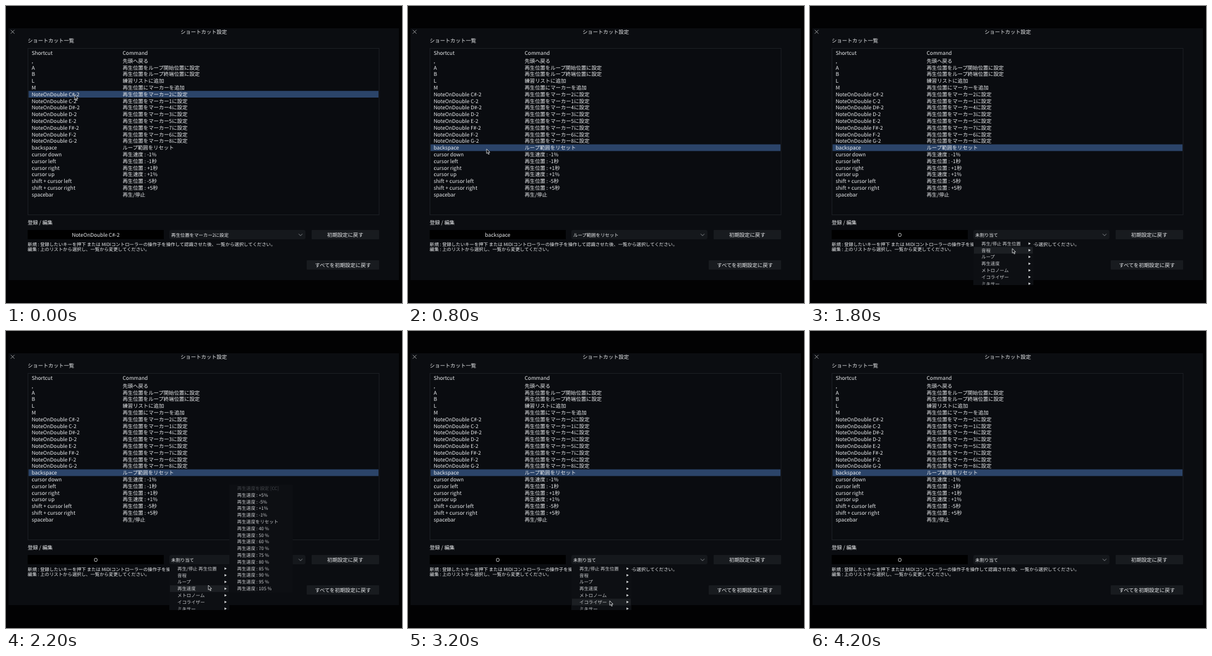
These frames come from a looping animation (640 px wide and 480 px high, 4400 ms). An HTML page:

```html
<!DOCTYPE html>
<html lang="ja">
<head>
<meta charset="utf-8">
<style>
html, body { margin: 0; width: 100%; height: 100%; overflow: hidden; background: #020203; }
svg { display: block; width: 640px; height: 480px; }
text { font: 8.35px "Noto Sans CJK JP", "Noto Sans CJK", sans-serif; fill: #eceef0; white-space: pre; text-rendering: geometricPrecision; }
.small { font-size: 7.4px; }
.item { font-size: 7.4px; fill: #c9cbce; }
.dim { fill: #42454a; }
.mid { text-anchor: middle; }
</style>
</head>
<body>
<svg id="stage" viewBox="0 0 640 480"></svg>
<script>
const NS = 'http://www.w3.org/2000/svg';
const stage = document.getElementById('stage');
const PITCH = 10.8, ROW_Y = 88.6, MENU_Y = 384, STEP = 200;

function add(parent, tag, attrs, content) {
  const el = document.createElementNS(NS, tag);
  for (const k in attrs) el.setAttribute(k, attrs[k]);
  if (content) el.textContent = content;
  parent.appendChild(el);
  return el;
}
const box = (p, x, y, width, height, fill, rx = 0) =>
  add(p, 'rect', { x, y, width, height, fill, rx });
// y is the vertical centre of the line
const label = (p, x, y, str, cls = '') =>
  add(p, 'text', { x, y: y + (/small|item/.test(cls) ? 2.8 : 3.1), class: cls }, str);
const show = (el, on) => el.setAttribute('visibility', on ? 'visible' : 'hidden');

const marker = n => `再生位置をマーカー${n}に設定`;
const note = n => `NoteOnDouble ${n}-2`;
const RESET = 'ループ範囲をリセット';
const rows = [
  [',', '先頭へ戻る'],
  ['A', '再生位置をループ開始位置に設定'],
  ['B', '再生位置をループ終端位置に設定'],
  ['L', '練習リストに追加'],
  ['M', '再生位置にマーカーを追加'],
  [note('C#'), marker(2)], [note('C'), marker(1)],
  [note('D#'), marker(4)], [note('D'), marker(3)],
  [note('E'), marker(5)], [note('F#'), marker(7)],
  [note('F'), marker(6)], [note('G'), marker(8)],
  ['backspace', RESET],
  ['cursor down', '再生速度 : -1%'],
  ['cursor left', '再生位置 : -1秒'],
  ['cursor right', '再生位置 : +1秒'],
  ['cursor up', '再生速度 : +1%'],
  ['shift + cursor left', '再生位置 : -5秒'],
  ['shift + cursor right', '再生位置 : +5秒'],
  ['spacebar', '再生/停止']
];

// Window and list
box(stage, 4, 36, 631, 407, '#0b0d11');
add(stage, 'path', { d: 'M7.7 38.7l6 6m0-6l-6 6', stroke: '#b4b6b9', 'stroke-width': .8 });
label(stage, 319.5, 41.5, 'ショートカット設定', 'mid');
label(stage, 35, 55.7, 'ショートカット一覧');
add(stage, 'rect', { x: 35.5, y: 68.5, width: 567.5, height: 269, fill: '#0a0c10', stroke: '#1c1f24' });
label(stage, 41.5, 76.2, 'Shortcut');
label(stage, 188.5, 76.2, 'Command');
const selection = box(stage, 36.5, 0, 565.5, 10.8, '#2b4469');
rows.forEach(([key, cmd], i) => {
  label(stage, 41.5, ROW_Y + i * PITCH, key);
  label(stage, 188.5, ROW_Y + i * PITCH, cmd);
});

// Editor
label(stage, 35, 350, '登録 / 編集');
box(stage, 35, 362, 220, 15, '#000');
const field = label(stage, 145, 369.6, '', 'mid');
box(stage, 264, 362, 220, 15, '#15181c', 3);
const combo = label(stage, 267, 369.8, '', 'small');
add(stage, 'path', { d: 'M473 368.3l3 3 3-3', fill: 'none', stroke: '#a0a3a7', 'stroke-width': .8 });
box(stage, 494, 362, 109, 15, '#181b1f', 1);
label(stage, 548.3, 369.6, '初期設定に戻す', 'mid');
label(stage, 35, 385.4, '新規 : 登録したいキーを押下 または MIDIコントローラーの操作子を操作して認識させた後、一覧から選択してください。', 'small');
label(stage, 35, 393, '編集 : 上のリストから選択し、一覧から変更してください。', 'small');
box(stage, 486, 411, 117, 15, '#181b1f', 1);
label(stage, 544.5, 418.7, 'すべてを初期設定に戻す', 'mid');

// Menus are cut off at the lower edge
const clip = add(add(stage, 'defs'), 'clipPath', { id: 'cut' });
box(clip, 0, 0, 640, 451, '#fff');
const menus = add(stage, 'g', { 'clip-path': 'url(#cut)' });
const menu = add(menus, 'g');
box(menu, 264, 377.5, 97, 74, '#0d0f13');
const hover = box(menu, 265, 0, 95, 10.8, '#1c1f23');
['再生/停止 再生位置', '音程', 'ループ', '再生速度', 'メトロノーム', 'イコライザー', 'ミキサー']
  .forEach((name, i) => {
    const y = MENU_Y + i * PITCH;
    label(menu, 277, y, name, 'item');
    add(menu, 'path', { d: `M353.2 ${y - 2}l3.6 2-3.6 2z`, fill: '#d6d8da' });
  });

function submenu(width, top, height, items) {
  const g = add(menus, 'g');
  box(g, 361, top, width, height, '#0d0f13');
  items.forEach((name, i) =>
    label(g, 373.5, top + 5.6 + i * PITCH, name, 'item' + (name.endsWith('[CC]') ? ' dim' : '')));
  return g;
}
const speeds = ['+5%', '-5%', '+1%', '-1%', null,
  ...[40, 50, 60, 70, 75, 80, 85, 90, 95, 105].map(n => n + ' %')];
const speedMenu = submenu(102.5, 248.6, 174.5, ['再生速度を設定 [CC]',
  ...speeds.map(s => s ? '再生速度 : ' + s : '再生速度をリセット')]);
const mixerMenu = submenu(222, 421.2, 30, ['音楽のボリュームを設定 [CC]',
  '音楽/メトロノームのボリュームバランスを設定 [CC]', 'メトロノームのボリューム設定 [CC]']);

const pointer = add(stage, 'path', {
  d: 'M0 0v7.4l1.7-1.5 1.3 2.9 1.3-.6-1.3-2.8h2.3z',
  fill: '#0b0d11', stroke: '#e4e6e8', 'stroke-width': .8
});

// Pointer x, y and hovered menu entry; -1 is none
const path = [
  [111, 144], [114, 160], [118, 173], [127, 237], [127, 231], null,
  [327, 368, -1], [327, 375, -1], [327, 381, 0], [327, 392, 1], [327, 403, 2],
  [327, 411, 3], [327, 414, 3], [326, 424, 4], [326, 431, 5], [326, 434, 5],
  [326, 436, 5], [326, 441, 6], [325, 442, 6], [325, 442, 6], [325, 442, 6], null
];

let last = -1;
function draw(step) {
  const row = step < 2 ? 5 : step < 4 ? 8 : 13;
  const typed = step > 4;
  selection.setAttribute('y', ROW_Y + row * PITCH - 5.4);
  field.textContent = typed ? 'O' : rows[row][0];
  combo.textContent = typed ? '未割り当て' : rows[row][1];

  const at = path[step];
  const open = at && at.length > 2;
  const entry = open ? at[2] : -1;
  show(pointer, at);
  if (at) pointer.setAttribute('transform', `translate(${at[0]} ${at[1]})`);
  show(menu, open);
  show(hover, entry >= 0);
  hover.setAttribute('y', MENU_Y + entry * PITCH - 5.4);
  show(speedMenu, entry === 3);
  show(mixerMenu, entry === 6 && step > 17);
}
function tick() {
  const step = Math.floor(performance.now() / STEP) % path.length;
  if (step !== last) draw(last = step);
  requestAnimationFrame(tick);
}
tick();
</script>
</body>
</html>
```
